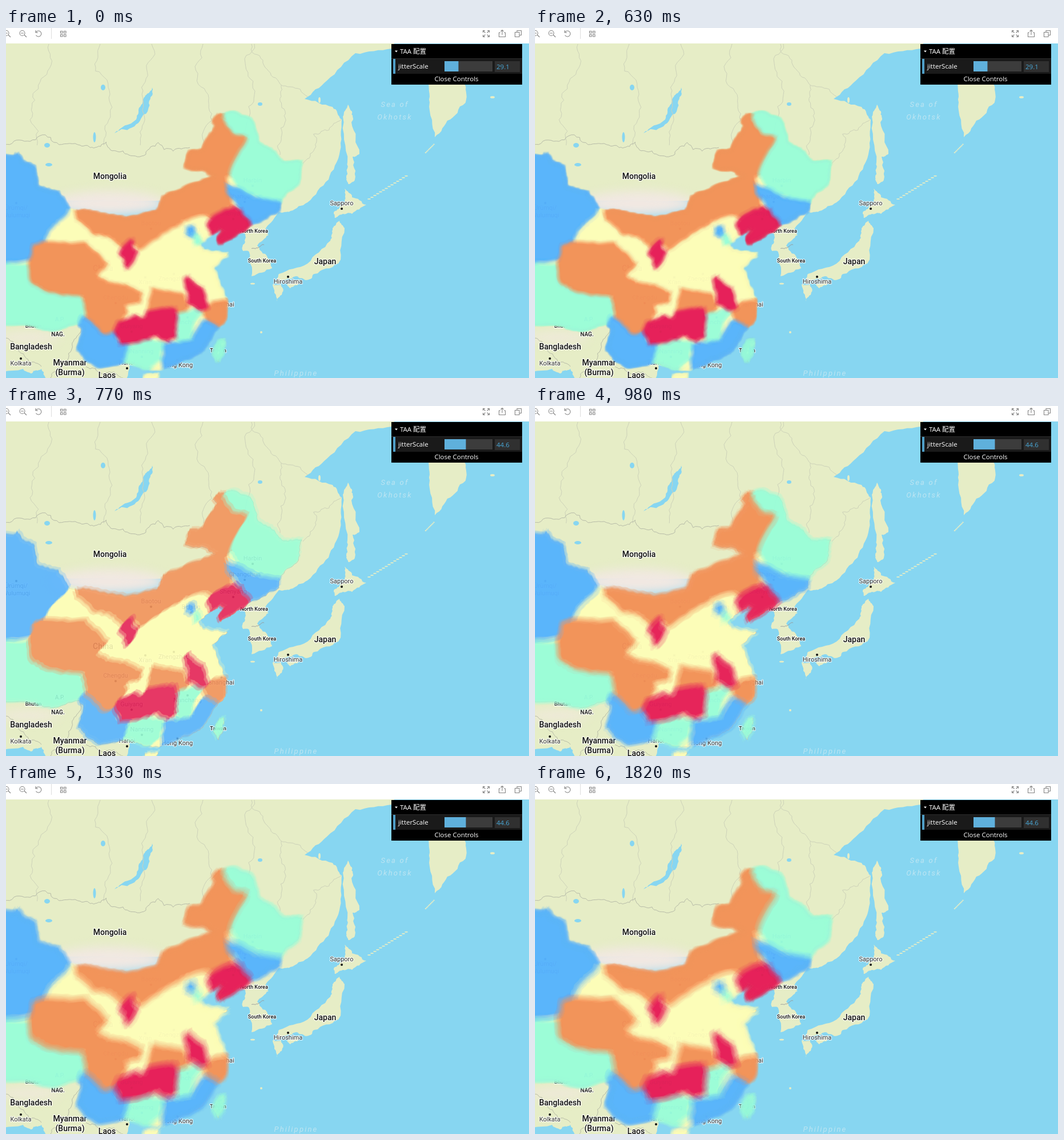
An HTML page with a canvas that plays this animation: 916x612 px, repeating every 1.89 s.

```html
<!DOCTYPE html>
<html lang="en">
<head>
<meta charset="utf-8">
<title>Jittered map layer</title>
<style>
html, body { margin: 0; width: 100%; height: 100%; overflow: hidden; background: #fff; }
canvas { display: block; }
</style>
</head>
<body>
<canvas id="stage" width="916" height="612"></canvas>
<script>
const W = 916, H = 612, PAD = 20, LOOP = 1890, STEP = 70, RESET = 10;
const MAP_FONT = 'Roboto, sans-serif', UI_FONT = '"Open Sans", "Noto Sans CJK SC", sans-serif';
const BLUE = '#58b3ff', MINT = '#9affd8', ORANGE = '#f3945d', YELLOW = '#ffffb8', RED = '#e6265b';
const WATER = '#87d6f1', LAND = '#e6edc6', FAINT = '#cdd2b9', BORDER = '#b7bba8';

const stage = document.getElementById('stage').getContext('2d');
const base = layer(0), overlay = layer(PAD);

function layer(pad) {
  const canvas = document.createElement('canvas');
  canvas.width = W + 2 * pad;
  canvas.height = H + 2 * pad;
  const context = canvas.getContext('2d');
  context.translate(pad, pad);
  context.lineJoin = 'round';
  return context;
}

let seed = 7;
const rand = () => (seed = (seed * 16807) % 2147483647) / 2147483647 - 0.5;

// Splits each edge at a displaced midpoint, so a few key points give a natural border.
function rough(points, limit, depth) {
  if (!depth) return points;
  const out = [points[0]];
  for (let i = 1; i < points.length; i++) {
    const [ax, ay] = points[i - 1], [bx, by] = points[i];
    const length = Math.hypot(bx - ax, by - ay) || 1;
    const bend = rand() * Math.min(limit, length * 0.4) / length;
    out.push([(ax + bx) / 2 - (by - ay) * bend, (ay + by) / 2 + (bx - ax) * bend], points[i]);
  }
  return rough(out, limit, depth - 1);
}

function trace(points, limit = 4, depth = 3) {
  const path = new Path2D();
  rough(points, limit, depth).forEach(p => path.lineTo(...p));
  return path;
}

function shape(text) {
  const points = text.split(' ').map(p => p.split(',').map(Number));
  return trace([...points, points[0]]);
}

function fill(path, color = LAND) {
  base.fillStyle = color;
  base.fill(path);
}

function blob(x, y, rx, ry, color = LAND) {
  const path = new Path2D();
  path.ellipse(x, y, rx, ry, 0, 0, 7);
  fill(path, color);
}

// A winding border between two places.
function border(x1, y1, x2, y2, color = FAINT) {
  base.strokeStyle = color;
  base.lineWidth = 1;
  base.stroke(trace([[x1, y1], [x2, y2]], 40, 5));
}

function halo(text, x, y, size, weight) {
  base.font = `${weight} ${size}px ${MAP_FONT}`;
  base.strokeStyle = 'rgba(255,255,255,.75)';
  base.lineWidth = 2.5;
  base.strokeText(text, x, y);
  base.fillStyle = weight > 400 ? '#111' : '#333';
  base.fillText(text, x, y);
}

function city(name, x, y, side = -1) {
  halo(name, x, y + side * 9, 11, 400);
  blob(x, y, 2, 2, '#111');
}

const country = shape('-40,222 12,226 20,220 28,234 50,244 55,278 92,288 110,318 150,323 208,334 265,322 275,296 312,280 368,260 352,249 314,243 322,216 345,214 370,172 362,163 372,152 395,148 428,160 440,200 470,218 486,236 518,234 512,270 482,296 478,318 455,332 424,345 398,364 376,378 372,370 384,354 375,349 352,364 337,378 345,391 365,393 388,396 360,418 372,445 386,480 384,508 368,526 345,562 318,577 285,592 240,594 212,582 165,592 140,578 126,562 136,525 128,515 80,528 45,518 -40,516');
const taiwan = shape('373,548 382,546 380,562 372,584 363,568');
const hainan = shape('240,620 243,608 266,606 262,620');
country.addPath(taiwan);
country.addPath(hainan);

function drawBase() {
  base.fillStyle = WATER;
  base.fillRect(0, 0, W, H);

  fill(shape('-40,10 690,10 676,36 612,44 562,92 523,124 572,138 588,160 585,215 565,265 528,305 498,320 478,322 455,350 460,362 440,381 462,405 466,420 430,434 426,392 414,388 420,366 412,350 380,300 -40,300'));
  fill(shape('-40,500 150,500 222,570 212,620 76,620 62,596 45,604 30,596 -40,606'));
  fill(country);

  // Kamchatka, Sakhalin, Hokkaido, Honshu, Kyushu, Shikoku
  fill(shape('739,90 742,130 751,191 778,160 806,125 801,90'));
  fill(shape('599,134 606,146 605,165 619,220 607,225 611,265 600,273 596,262 598,235 590,155'));
  fill(shape('593,281 606,296 631,309 606,325 588,326 576,332 574,322 592,308'));
  fill(shape('584,337 593,350 582,412 540,430 530,440 508,434 472,446 478,430 528,412 568,372 572,350'));
  fill(shape('467,448 482,448 484,462 474,478'));
  fill(shape('492,449 515,438 510,450 498,455'));
  for (let i = 0; i < 9; i++) blob(735 + 1.8 * i, 218 - 1.8 * i, 1.4, 1);
  for (let i = 0; i < 14; i++) blob(636 + 5 * i, 299 - 3.1 * i, 3, 1);
  blob(852, 121, 4, 2);
  blob(549, 126, 2, 5);
  blob(432, 447, 4, 1.5);
  blob(447, 532, 2, 2);

  base.filter = 'blur(9px)';
  blob(180, 307, 100, 22, '#f1e8e2');
  blob(40, 541, 55, 9, '#f0e9dc');
  base.filter = 'none';

  fill(shape('256,104 256,118 248,146 225,172 190,184 228,160 237,134 244,118'), WATER);
  blob(155, 191, 2.5, 9, WATER);
  blob(170, 104, 4, 5, WATER);
  blob(445, 133, 4, 3, WATER);
  blob(72, 205, 5, 4, WATER);
  blob(75, 239, 6, 3, WATER);

  // Region borders fan out from the top edge.
  for (let x = 75; x < 440; x += 90) border(x, 28, x - 15 + 60 * rand(), 205);
  border(430, 28, 528, 120);
  border(482, 100, 480, 222);
  border(520, 237, 587, 160);
  border(-10, 212, 130, 205, BORDER);
  border(130, 205, 215, 222, BORDER);
  border(215, 222, 322, 209, BORDER);
  border(430, 386, 452, 379, '#999');
  border(-10, 540, 62, 592, BORDER);
  border(130, 520, 78, 612, BORDER);
  border(140, 592, 205, 612, BORDER);
  base.strokeStyle = BORDER;
  base.stroke(country);

  base.textAlign = 'center';
  base.textBaseline = 'middle';
  const place = (text, x, y, size = 14) => halo(text, x, y, size, 500);
  place('Mongolia', 182, 260);
  place('Japan', 559, 409);
  place('China', 170, 421);
  place('Bangladesh', 44, 558);
  place('Myanmar', 112, 586);
  place('(Burma)', 112, 603);
  place('Laos', 177, 608);
  place('North Korea', 434.5, 355.5, 9);
  place('South Korea', 448.5, 407, 9);
  place('Taiwan', 371.5, 564, 9);
  place('Bhutan', 48, 521, 9);
  place('NAG.', 91, 536.5, 10);
  place('A.P.', 94, 510, 10);
  city('Sapporo', 588, 316);
  city('Harbin', 432, 276);
  city('Changchun', 418, 304);
  city('Shenyang', 398, 334);
  city('Baotou', 254, 351);
  city('Beijing', 324, 361);
  city('Chengdu', 192, 481);
  city('Guiyang', 220, 531);
  city('Nanning', 238, 575);
  city('Hanoi', 212, 595);
  city('Hiroshima', 494, 435, 1);
  city("Xi'an", 244, 436, 1);
  city('Zhengzhou', 294, 430, 1);
  city('Shanghai', 377, 475, 1);
  city('Nanchang', 318, 506, 1);
  city('Hong Kong', 300, 581, 1);
  city('Kolkata', 26, 578, 1);
  city('Ürümqi/', 18, 306, 1);
  halo('Wulumuqi', 18, 328, 11, 400);

  base.font = `italic 400 13px ${MAP_FONT}`;
  base.letterSpacing = '2.2px';
  base.fillStyle = '#bde5f2';
  base.fillText('Sea of', 681, 134);
  base.fillText('Okhotsk', 681, 156);
  base.fillText('Philippine', 508, 604);
}

// Provinces are loose shapes: the country outline trims them and later ones cover earlier ones.
function province(color, text) {
  const path = shape(text);
  overlay.fillStyle = overlay.strokeStyle = color;
  overlay.fill(path);
  overlay.stroke(path);
}

function drawOverlay() {
  overlay.clip(country);
  overlay.lineWidth = 2;
  overlay.fillStyle = YELLOW;
  overlay.fillRect(-PAD, -PAD, W + 2 * PAD, H + 2 * PAD);
  province(BLUE, '-40,200 60,200 112,300 108,320 82,348 68,372 46,392 52,405 -40,412');
  province(ORANGE, '122,300 260,300 300,180 350,130 381,152 398,184 424,188 410,238 385,262 398,312 357,332 345,327 312,336 300,347 232,388 222,372 208,395 190,370 152,360 124,335');
  province(MINT, '381,140 450,140 540,220 530,290 478,308 448,300 410,282 392,256 424,190 398,184 381,160');
  province(BLUE, '385,272 410,282 448,300 500,306 490,330 428,350 408,314 392,295');
  province(RED, '352,346 360,332 398,312 412,318 428,342 400,372 370,385 358,358');
  province(MINT, '-40,412 42,412 45,446 78,462 130,462 138,500 120,540 -40,540');
  province(BLUE, '136,504 172,534 190,530 198,550 218,557 200,600 120,600 120,530');
  province(ORANGE, '48,380 65,374 140,375 178,412 160,435 178,446 212,450 238,463 235,480 208,488 212,500 180,534 170,534 140,506 136,470 78,462 45,445 40,415');
  province(ORANGE, '255,455 290,462 312,466 320,490 305,500 240,507 250,485');
  province(ORANGE, '345,498 365,478 400,478 400,530 358,523');
  province(BLUE, '276,552 325,546 345,512 380,525 380,600 272,598');
  province(MINT, '214,556 250,545 277,549 272,580 250,598 206,582');
  province(MINT, '298,502 330,492 344,498 328,522 325,545 300,550');
  province(RED, '196,515 225,502 240,508 248,495 278,490 296,490 300,505 298,540 285,549 262,537 250,545 200,553 190,530');
  province(RED, '312,440 320,434 334,450 345,455 354,488 340,494 318,480 320,465');
  province(RED, '213,375 221,370 222,385 230,390 218,415 210,421 206,402 198,395');
  province(BLUE, '317,348 329,347 332,358 325,366 315,361');
  province(MINT, '328,362 336,360 342,372 330,380');
  overlay.fillStyle = MINT;
  overlay.fill(taiwan);
}

function halton(index, radix) {
  let sum = 0;
  for (let f = 1 / radix; index > 0; f /= radix) {
    sum += f * (index % radix);
    index = Math.floor(index / radix);
  }
  return sum;
}

function rect(color, x, y, w, h) {
  stage.fillStyle = color;
  stage.fillRect(x, y, w, h);
}

function text(string, x, y, color = '#fff') {
  stage.font = `500 11.5px ${UI_FONT}`;
  stage.fillStyle = color;
  stage.fillText(string, x, y);
}

function makeIcons() {
  const icons = new Path2D();
  const add = d => icons.addPath(new Path2D(d));
  for (const x of [1, 29]) add(`M${x - 5} 9a4.500 4.500 0 1 0 9 0a4.500 4.500 0 1 0-9 0M${x + 3} 12l4 4M${x - 3} 9h5`);
  add('M52 4v4h4M52.500 7.500a5 5 0 1 1 0 5');
  for (const x of [95.5, 101.5]) for (const y of [5.5, 11.5]) icons.rect(x, y, 3.5, 3.5);
  for (const sx of [-1, 1]) for (const sy of [-1, 1]) {
    const x = 841 + 5.5 * sx, y = 10 + 5.5 * sy;
    add(`M${x} ${y - 3.5 * sy}V${y}H${x - 3.5 * sx}M${x} ${y}l${-4 * sx} ${-4 * sy}`);
  }
  add('M866 8h-2.500v7.500h11v-7.500h-2.500M869 12v-8M866.500 6l2.500-2.500l2.500 2.500');
  add('M895 7v-2.500h7.500v8h-3M891.500 7.500h7.500v8h-7.500z');
  return icons;
}
const icons = makeIcons();

function drawChrome(scale) {
  rect('#fff', 0, 0, W, 27);
  rect('#ddd', 79, 0, 1, 19);
  stage.strokeStyle = '#858585';
  stage.lineWidth = 1.1;
  stage.stroke(icons);

  rect('#000', 675, 28, 229, 71);
  rect('#2c2c2c', 675, 53, 229, 1);
  rect('#1a1a1a', 680, 54, 224, 26);
  rect('#4f9fc8', 678, 54, 4, 26);
  rect('#3c3c3c', 768, 58, 84, 18);
  rect('#5fb0dc', 768, 58, 84 * scale / 100, 18);
  rect('#303030', 856, 58, 44, 19);
  stage.fillStyle = '#fff';
  stage.fill(new Path2D('M681 39.500h5l-2.500 3z'));
  stage.textBaseline = 'middle';
  stage.textAlign = 'left';
  text('TAA 配置', 690, 41.5);
  text('jitterScale', 687, 67.5);
  text(scale.toFixed(1), 859, 68.5, '#48a8d8');
  stage.textAlign = 'center';
  text('Close Controls', 789, 90);
}

function draw(step) {
  const fresh = step >= RESET;
  const scale = fresh ? 44.6 : 29.1;
  const samples = fresh ? 1 + 3 * (step - RESET) : 50 + 3 * step;
  const reach = scale * 0.34;

  // Each sample is laid over the last with a small offset, so the edges spread.
  stage.drawImage(base.canvas, 0, 0);
  for (let i = 0; i < samples; i++) {
    stage.globalAlpha = i ? Math.max(0.12, 1 / (i + 1)) : 0.6;
    const dx = i && (halton(i, 2) - 0.5) * reach;
    const dy = i && (halton(i, 3) - 0.5) * reach;
    stage.drawImage(overlay.canvas, dx - PAD, dy - PAD);
  }
  stage.globalAlpha = 1;
  drawChrome(scale);
}

let shown = -1;
function tick() {
  const step = Math.floor(performance.now() % LOOP / STEP);
  if (step !== shown) draw(shown = step);
  requestAnimationFrame(tick);
}

drawBase();
drawOverlay();
tick();
</script>
</body>
</html>
```
